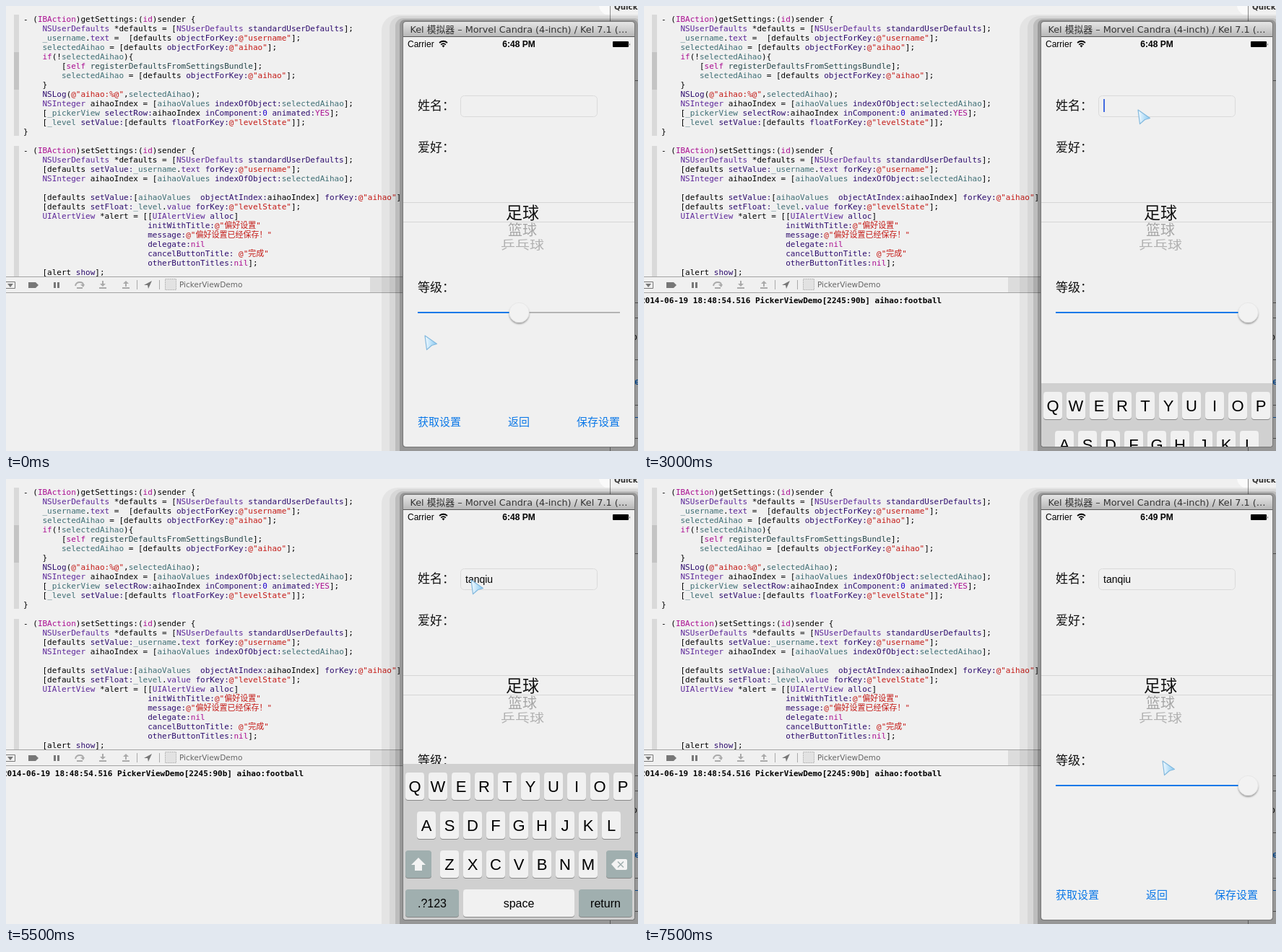
Recreate the animation shown at these times as an HTML page. Size 875 by 617 pixels, loop 8000 ms.

```html
<!DOCTYPE html>
<html lang="zh">
<head>
<meta charset="utf-8">
<title>Settings demo</title>
<style>
html, body { margin: 0; width: 100%; height: 100%; overflow: hidden; background: #f0f0f0; }
svg { display: block; }
text { white-space: pre; font-family: "Liberation Sans", Arial, sans-serif; }
.mono text, text.mono { font: 11px "DejaVu Sans Mono", "Noto Sans CJK SC", "Noto Sans CJK", monospace; }
.ui { font-family: "DejaVu Sans", "Noto Sans CJK SC", "Noto Sans CJK", sans-serif; }
.cn text { font-family: "Noto Sans CJK SC", "Noto Sans CJK", sans-serif; }
.mid { text-anchor: middle; }
</style>
</head>
<body>
<svg width="875" height="617" viewBox="0 0 875 617">
  <defs>
    <linearGradient id="bar" x2="0" y2="1"><stop stop-color="#e6e6e6"/><stop offset="1" stop-color="#b8b8b8"/></linearGradient>
    <linearGradient id="ice"><stop stop-color="#f4fbff"/><stop offset="1" stop-color="#86c8f2"/></linearGradient>
    <clipPath id="screen"><path d="M550 43H870V607Q870 611 866 611H554Q550 611 550 607Z"/></clipPath>
    <filter id="soft" x="-50%" y="-50%" width="200%" height="200%"><feDropShadow dx="0" dy="2" stdDeviation="1.3" flood-opacity=".35"/></filter>
  </defs>
  <rect width="875" height="617" fill="#f0f0f0"/>

  <!-- editor -->
  <path d="M11 12H18V180H11ZM11 194H18V375H11Z" fill="#d9d9d9"/>
  <path d="M11 64H18V116H11Z" fill="#c4c4c4"/>
  <g id="code" class="mono"></g>

  <!-- debug bar -->
  <rect y="375" width="550" height="23" fill="#f0f0f0"/>
  <rect x="504" y="376" width="46" height="21" fill="#dcdcdc"/>
  <path d="M0 375.5H550M0 397.5H550" stroke="#a3a3a3"/>
  <g fill="#777" stroke="none">
    <path d="M0 382.5H12.5V391.5H0" fill="none" stroke="#777"/>
    <path d="M2 385H10L6 390Z"/>
    <path d="M31 383H41L45 387L41 391H31Z"/>
    <path d="M66 383H69V391H66ZM71 383H74V391H71Z"/>
    <g fill="#aaa">
      <path d="M96 388Q97 383 102 383T107 387" fill="none" stroke="#aaa" stroke-width="2"/>
      <path d="M103 386H109L107 390ZM98 390H106V392H98Z"/>
      <path d="M133 381H135V385H138L134 389L130 385H133ZM129 390H139V392H129Z"/>
      <path d="M165 389H167V385H170L166 381L162 385H165ZM161 390H171V392H161Z"/>
    </g>
    <path d="M191 387L202 381L197 392L196 387Z"/>
    <path d="M181.5 380V393M212.5 380V393" stroke="#aaa"/>
    <rect x="220.500" y="378.500" width="15" height="15" fill="#e2e2e2" stroke="#b5b5b5" stroke-dasharray="2 1"/>
  </g>
  <text class="ui" x="240" y="390" font-size="10.5" fill="#666">PickerViewDemo</text>
  <text id="log" class="mono" x="-5" y="412" style="font-weight:bold">2014-06-19 18:48:54.516 PickerViewDemo[2245:90b] aihao:football</text>

  <!-- side panel -->
  <path d="M821 0H836V12H830Q822 8 821 0Z" fill="#fafafa"/>
  <path d="M836.500 0V617" stroke="#8c8c8c"/>
  <text class="ui" x="842" y="5" font-size="10.300" font-weight="bold" fill="#333">Quick</text>
  <path d="M869 103.500H875M869 411.500H875M869 432.500H875M869 490.500H875M869 553.500H875M869 599.500H875" stroke="#777"/>
  <text x="867" y="463" font-size="12">o</text>
  <text x="866" y="525" font-size="13" font-weight="bold" fill="#1372d8">te</text>
  <path d="M869 570.500H875" stroke="#1372d8"/>
  <g id="shade"></g>

  <!-- simulator window -->
  <path d="M549 611V26Q549 21 554 21H866Q871 21 871 26V608Q871 612 867 612H553Q549 612 549 608Z" fill="#777"/>
  <path d="M550 42V26Q550 22 554 22H866Q870 22 870 26V42Z" fill="url(#bar)"/>
  <text class="ui mid" x="710" y="37" font-size="12.800" fill="#333">Kel 模拟器 – Morvel Candra (4-inch) / Kel 7.1 (…</text>
  <g clip-path="url(#screen)">
    <rect x="550" y="43" width="320" height="568" fill="#f0f0f0"/>
    <text x="556" y="57" font-size="12">Carrier</text>
    <g fill="none" stroke="#000" stroke-width="1.700">
      <path d="M600 51Q605.500 46.500 611 51M602.200 53.600Q605.500 50.800 608.800 53.600"/>
    </g>
    <path d="M603.500 55Q605.500 53.500 607.500 55L605.500 57.500Z"/>
    <text id="clock" class="mid" x="710" y="57" font-size="12" font-weight="bold"></text>
    <path d="M841 49H861Q862 49 862 50V56Q862 57 861 57H841Q840 57 840 56V50Q840 49 841 49ZM863 51.500Q864.500 53 863 55Z"/>
    <g class="cn" font-size="17" fill="#111">
      <text x="570" y="144">姓名：</text>
      <text x="570" y="202">爱好：</text>
      <text x="570" y="396">等级：</text>
      <g class="mid">
        <text x="715" y="295" font-size="23">足球</text>
        <text x="715" y="317.500" font-size="20" fill="#a6a6a6">篮球</text>
        <text transform="translate(715 337) scale(1 .78)" font-size="20" fill="#b0b0b0">乒乓球</text>
      </g>
    </g>
    <path d="M550 272.500H870M550 299.500H870" stroke="#d6d6d6"/>
    <rect x="629.500" y="124.500" width="189" height="29" rx="5" fill="none" stroke="#dadada"/>
    <text id="name" x="636" y="144" font-size="14"></text>
    <rect id="caret" y="129" width="2" height="18" fill="#426be0"/>
    <path d="M570 425H850" stroke="#b4b4b4" stroke-width="2"/>
    <path id="track" stroke="#0b78e8" stroke-width="2"/>
    <circle id="thumb" cy="425" r="13.700" fill="#f2f2f2" stroke="#ddd" stroke-width=".5" filter="url(#soft)"/>
    <g class="cn" font-size="15" fill="#0b78e8">
      <text id="get" x="570" y="582">获取设置</text>
      <text x="695" y="582">返回</text>
      <text x="790" y="582">保存设置</text>
    </g>
    <g id="keys" class="mid"></g>
  </g>
  <path d="M550 42.500H870" stroke="#555"/>
  <path id="pointer" d="M0 0L16.500 11.500L9.500 13.500L2.500 19.500Z" fill="url(#ice)" stroke="#83b9de" stroke-width="1.200" stroke-linejoin="round"/>
</svg>
<script>
const $ = id => document.getElementById(id);

const source = `- (IBAction)getSettings:(id)sender {
    NSUserDefaults *defaults = [NSUserDefaults standardUserDefaults];
    _username.text =  [defaults objectForKey:@"username"];
    selectedAihao = [defaults objectForKey:@"aihao"];
    if(!selectedAihao){
        [self registerDefaultsFromSettingsBundle];
        selectedAihao = [defaults objectForKey:@"aihao"];
    }
    NSLog(@"aihao:%@",selectedAihao);
    NSInteger aihaoIndex = [aihaoValues indexOfObject:selectedAihao];
    [_pickerView selectRow:aihaoIndex inComponent:0 animated:YES];
    [_level setValue:[defaults floatForKey:@"levelState"]];
}

- (IBAction)setSettings:(id)sender {
    NSUserDefaults *defaults = [NSUserDefaults standardUserDefaults];
    [defaults setValue:_username.text forKey:@"username"];
    NSInteger aihaoIndex = [aihaoValues indexOfObject:selectedAihao];

    [defaults setValue:[aihaoValues  objectAtIndex:aihaoIndex] forKey:@"aihao"];
    [defaults setFloat:_level.value forKey:@"levelState"];
    UIAlertView *alert = [[UIAlertView alloc]
                          initWithTitle:@"偏好设置"
                          message:@"偏好设置已经保存！"
                          delegate:nil
                          cancelButtonTitle: @"完成"
                          otherButtonTitles:nil];
    [alert show];`;

const rules = [
  ['#c41a16', '@"[^"]*"'],
  ['#aa0d91', '\\b(?:IBAction|id|if|self|nil|YES)\\b'],
  ['#2e0d6e', 'NSLog|standardUserDefaults|\\balloc|\\bshow|(?<![)\\w])[a-z]\\w+:'],
  ['#5c2699', '\\b(?:NS|UI)\\w+|(?<=\\.)\\w+'],
  ['#26474b', 'registerDefaults\\w+'],
  ['#3f6e74', '\\b_\\w+|selectedAihao|aihaoValues'],
  ['#1c00cf', '\\b0\\b']
];
const tokens = new RegExp(rules.map(r => `(${r[1]})`).join('|'), 'g');
const paint = line => line.replace(tokens, (s, ...groups) =>
  `<tspan fill="${rules[groups.slice(0, rules.length).findIndex(Boolean)][0]}">${s}</tspan>`);
$('code').innerHTML = source.split('\n').map((line, i) =>
  `<text x="24" y="${22 + 13 * i}">${paint(line)}</text>`).join('');

// Stepped window shadow
$('shade').innerHTML = [[520, 12, 22, .05], [531, 14, 16, .06], [539, 17, 11, .12], [545, 19, 7, .2]]
  .map(([x, y, r, a]) => `<rect x="${x}" y="${y}" width="${1420 - 2 * x}" height="700" rx="${r}" fill-opacity="${a}"/>`).join('');

const key = (x, y, w, label, size = 22, fill = '#f1f1f1') =>
  `<rect x="${x}" y="${y + 1}" width="${w}" height="38" rx="4" fill="#888"/>
   <rect x="${x}" y="${y}" width="${w}" height="38" rx="4" fill="${fill}"/>
   <text x="${x + w / 2}" y="${y + 19 + size * .36}" font-size="${size}">${label}</text>`;
const gray = '#a0afaf';
$('keys').innerHTML = '<rect x="550" y="395" width="320" height="216" fill="#d0d0d0"/>' +
  [['QWERTYUIOP', 553], ['ASDFGHJKL', 569], ['ZXCVBNM', 601]].map(([row, x], r) =>
    [...row].map((c, i) => key(x + 32 * i, 407 + 54 * r, 26, c)).join('')).join('') +
  key(553, 515, 36, '', 16, gray) + key(831, 515, 36, '', 16, gray) +
  key(553, 569, 74, '.?123', 16, gray) + key(633, 569, 154, 'space', 16) + key(793, 569, 74, 'return', 16, gray) +
  `<path d="M571 525L581 535H576V543H566V535H561Z" fill="#f4f4f4"/>
   <path d="M838 534L845 527H858Q860 527 860 529V540Q860 542 858 542H845Z" fill="#f4f4f4"/>
   <path d="M847 530.500L855 538.500M855 530.500L847 538.500" stroke="${gray}" stroke-width="1.500"/>`;

// Each entry: step it starts at, then its value
const at = (list, step) => list.filter(e => e[0] <= step).pop().slice(1);
const pointer = [[0, 580, 457], [1, 600, 544], [2, 600, 581], [5, 688, 153], [6, 684, 144],
  [11, 644, 140], [12, 813, 512], [13, 833, 598], [15, 718, 391]];
const keyboard = [[0, 217], [6, 128], [7, 0], [14, 110], [15, 217]];
const typed = [[0, ''], [9, 'tanq'], [10, 'tanqiu']];
const caret = [[0, false], [6, true], [8, false], [9, true], [11, false]];

let shown = -1;
function frame() {
  const step = Math.floor(performance.now() % 8000 / 500);
  if (step !== shown) {
    shown = step;
    const thumb = step < 4 ? 710.5 : 836.5;
    $('pointer').setAttribute('transform', `translate(${at(pointer, step)})`);
    $('keys').setAttribute('transform', `translate(0 ${at(keyboard, step)})`);
    $('name').textContent = at(typed, step)[0];
    $('caret').setAttribute('x', 636 + Math.round($('name').getComputedTextLength()));
    $('caret').setAttribute('visibility', at(caret, step)[0] ? 'visible' : 'hidden');
    $('log').setAttribute('visibility', step < 4 ? 'hidden' : 'visible');
    $('get').setAttribute('opacity', step === 3 ? .2 : 1);
    $('clock').textContent = step < 15 ? '6:48 PM' : '6:49 PM';
    $('thumb').setAttribute('cx', thumb);
    $('track').setAttribute('d', `M570 425H${thumb}`);
  }
  requestAnimationFrame(frame);
}
frame();
</script>
</body>
</html>
```
